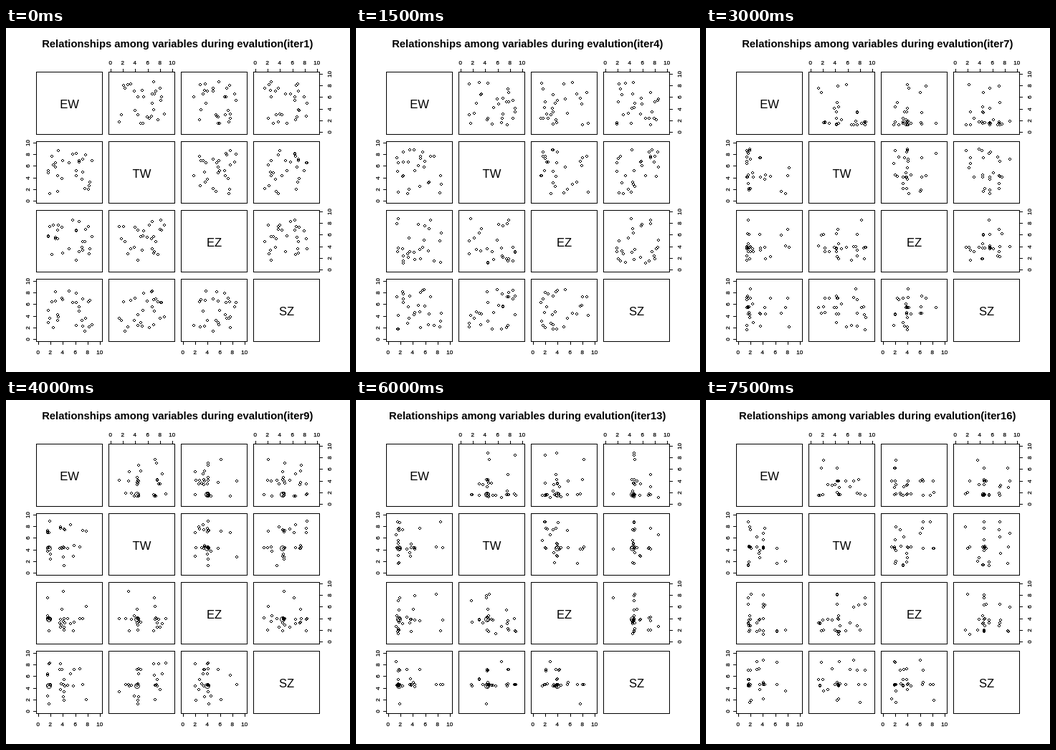
Animation, 480 px wide and 480 px high, one loop 8 s. Source, as an HTML page:

```html
<!DOCTYPE html>
<html lang="en">
<head>
<meta charset="utf-8">
<title>Scatter matrix</title>
<style>
  html, body { margin: 0; width: 100%; height: 100%; overflow: hidden; background: #fff; }
  svg { display: block; }
  text { font-family: "Liberation Sans", Arial, sans-serif; text-anchor: middle; fill: #000; }
  .title { font-size: 14.8px; font-weight: bold; }
  .name { font-size: 16.6px; }
  .tick { font-size: 8px; stroke: #000; stroke-width: 0.25; }
  path { fill: none; stroke: #000; stroke-width: 1; }
  .crisp { shape-rendering: crispEdges; }
</style>
</head>
<body>
<svg id="stage" width="480" height="480" viewBox="0 0 480 480"></svg>
<script>
const STEP = 500, STEPS = 16, SIZE = 28;
const NAMES = ['EW', 'TW', 'EZ', 'SZ'];
const WIDTH = 92, HEIGHT = 87;

// Panel edges, on pixel centres
const left = c => 42.5 + 101 * c;
const upper = r => 61.5 + Math.ceil(96.33 * r);
const lower = r => 148.5 + Math.floor(96.34 * r);
const px = (c, v) => left(c) + (v + 0.4) / 10.8 * WIDTH;
const py = (r, v) => lower(r) - (v + 0.4) / 10.8 * HEIGHT;

// The fittest individual, and the gene values that spread through the population
const BEST = [1.6, 4.2, 3.9, 4.4];
const POOL = [[1.6, 1.7, 3.5, 4.1], [4.3, 4.4, 8.8, 7.6], [4, 3.9, 1.9, 3.3], [4.5, 4.6, 5.6, 7.2]];

function random(seed) {
  let s = seed * 7919 % 2147483647;
  const next = () => (s = s * 48271 % 2147483647) / 2147483647;
  for (let i = 0; i < 5; i++) next();
  return next;
}

// Genes settle on the pool values as the generations pass
function population(iter) {
  const rnd = random(iter + 40);
  const settled = Math.min(0.52, (iter - 1) * 0.08);
  const skew = iter > 1 ? 1.6 : 1;
  const gene = (values, g) => {
    const kept = rnd() < settled, a = rnd(), b = rnd();
    if (kept) return values[Math.floor(a * 4)] + (b - 0.5) * 0.3;
    return 1.2 + 7.7 * (g ? a : a ** skew);
  };
  return Array.from({ length: SIZE }, () => POOL.map(gene));
}

// Dots are four-pixel rings built from their sides
const dot = (x, y) =>
  `M${x - 1} ${y - 1.5}h2M${x - 1} ${y + 1.5}h2M${x - 1.5} ${y - 1}v2M${x + 1.5} ${y - 1}v2`;
const ring = (x, y) => `M${x - 3.5} ${y}a3.5 3.5 0 1 0 7 0a3.5 3.5 0 1 0 -7 0`;

function scatter(person, shape) {
  let d = '';
  for (let r = 0; r < 4; r++) {
    for (let c = 0; c < 4; c++) {
      if (r !== c) d += shape(Math.round(px(c, person[c])), Math.round(py(r, person[r])));
    }
  }
  return d;
}

const shapes = Array.from({ length: STEPS }, (_, i) =>
  population(i + 1).map(p => scatter(p, dot)).join(''));

const stage = document.getElementById('stage');
function add(tag, attrs, text = '') {
  const el = document.createElementNS('http://www.w3.org/2000/svg', tag);
  for (const k in attrs) el.setAttribute(k, attrs[k]);
  el.textContent = text;
  return stage.appendChild(el);
}
const label = (cls, x, y, text, turn) =>
  add('text', { class: cls, x, y, ...(turn && { transform: `rotate(-90 ${x} ${y})` }) }, text);

const snap = v => Math.floor(v) + 0.5;
const right = left(3) + WIDTH;
let lines = '';
for (let i = 0; i < 4; i++) {
  for (let c = 0; c < 4; c++) lines += `M${left(c)} ${upper(i)}h${WIDTH}V${lower(i)}h${-WIDTH}z`;
  label('name', left(i) + WIDTH / 2, (upper(i) + lower(i)) / 2 + 7, NAMES[i]);
  const odd = i % 2;
  for (let v = 0; v <= 10; v += 2) {
    const x = snap(px(i, v)), y = snap(py(i, v));
    lines += odd ? `M${x} ${upper(0)}v-4.5` : `M${x} ${lower(3)}v4.5`;
    lines += odd ? `M${left(0)} ${y}h-4.5` : `M${right} ${y}h4.5`;
    label('tick', x - 0.8, odd ? 51 : 455, v);
    label('tick', odd ? 33 : 454, y, v, true);
  }
}
add('path', { class: 'crisp', d: lines });
const title = label('title', 239.3, 27, '');
const dots = add('path', { class: 'crisp' });
const best = add('path', { d: scatter(BEST, ring) });

let shown = -1;
function draw(now) {
  const i = Math.floor(now / STEP) % STEPS, iter = i + 1;
  if (i !== shown) {
    shown = i;
    title.textContent = `Relationships among variables during evalution(iter${iter})`;
    dots.setAttribute('d', shapes[i]);
    best.style.display = iter >= 8 && iter < STEPS ? '' : 'none';
  }
  requestAnimationFrame(() => draw(performance.now() - start));
}
const start = performance.now();
draw(0);
</script>
</body>
</html>
```
